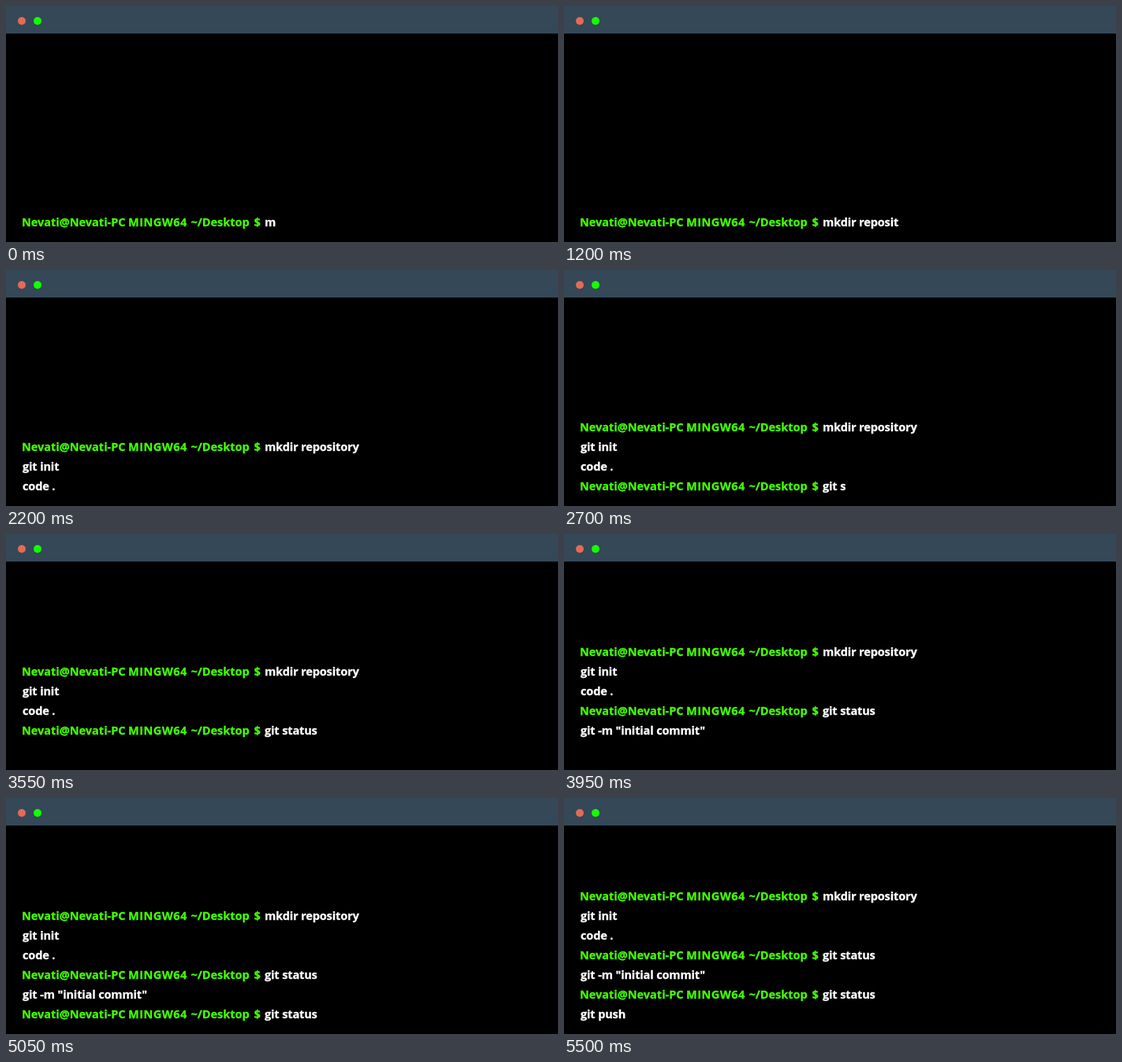
Animation of 700 by 300 pixels, one loop 6.85 s. Source, as an HTML page:

```html
<!DOCTYPE html>
<html lang="en">
<head>
<meta charset="utf-8">
<title>Terminal</title>
<style>
  html, body { margin: 0; width: 100%; height: 100%; overflow: hidden; background: #000; }
  svg { display: block; width: 700px; height: 300px; }
  text {
    font: 700 14.5px "Open Sans", "Noto Sans", sans-serif;
    letter-spacing: -.13px;
    fill: #fff;
    stroke: #fff;
    stroke-width: .3px;
    white-space: pre;
  }
  .prompt text { letter-spacing: 0; fill: #4f0; stroke: #4f0; }
  .prompt .system { letter-spacing: .5px; }
</style>
</head>
<body>
<svg viewBox="0 0 700 300">
  <rect width="700" height="300"/>
  <rect width="700" height="35" fill="#344858"/>
  <circle cx="20" cy="19" r="5" fill="#e56a54"/>
  <circle cx="40" cy="19" r="5" fill="#14ff00"/>
  <defs>
    <g id="prompt" class="prompt">
      <text x="20">Nevati@Nevati-PC</text>
      <text x="155" class="system">MINGW64</text>
      <text x="234.5">~/Desktop</text>
      <text x="314.5">$</text>
    </g>
  </defs>
  <g id="screen"></g>
</svg>
<script>
const LOOP = 6850, KEY_DELAY = 100, LINE_HEIGHT = 25, BASELINE = 280;

// open: the line takes up a row; show: its text or first key appears
const lines = [
  { open: 0, show: 0, text: 'mkdir repository', typed: true },
  { open: 1900, show: 2100, text: 'git init' },
  { open: 2200, show: 2200, text: 'code .' },
  { open: 2300, show: 2300, text: 'git status', typed: true },
  { open: 3550, show: 3750, text: 'git -m "initial commit"' },
  { open: 3950, show: 4150, text: 'git status', typed: true },
  { open: 5300, show: 5500, text: 'git push' }
];

const screen = document.getElementById('screen');

function add(parent, tag, attributes = {}) {
  const node = document.createElementNS('http://www.w3.org/2000/svg', tag);
  for (const [key, value] of Object.entries(attributes)) node.setAttribute(key, value);
  return parent.appendChild(node);
}

const promptSource = document.getElementById('prompt');
for (const line of lines) {
  line.row = add(screen, 'g');
  if (line.typed) {
    const prompt = promptSource.cloneNode(true);
    prompt.removeAttribute('id');
    line.row.append(prompt);
  }
  line.label = add(line.row, 'text', { x: line.typed ? 328 : 21 });
}

function render(time) {
  const rows = lines.filter(line => time >= line.open).length;
  lines.forEach((line, index) => {
    const age = time - line.show;
    const y = BASELINE - (rows - 1 - index) * LINE_HEIGHT;
    line.row.setAttribute('transform', `translate(0 ${y})`);
    line.row.setAttribute('visibility', age >= 0 ? 'visible' : 'hidden');
    const length = line.typed ? Math.max(0, Math.floor(age / KEY_DELAY) + 1) : line.text.length;
    const shown = line.text.slice(0, length);
    if (line.label.textContent !== shown) line.label.textContent = shown;
  });
}

const start = performance.now();
function frame() {
  render((performance.now() - start) % LOOP);
  requestAnimationFrame(frame);
}
frame();
</script>
</body>
</html>
```
